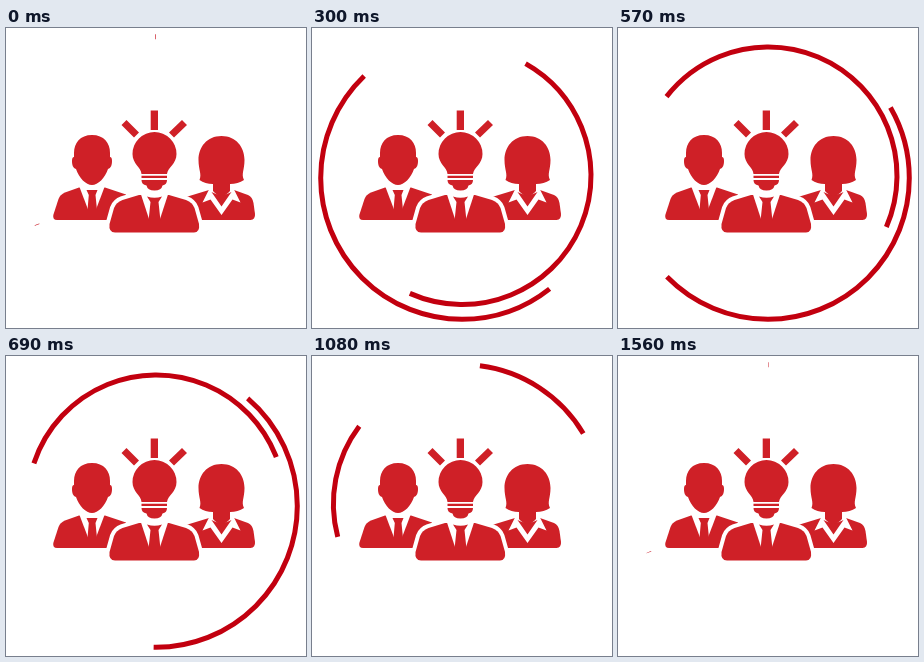
An HTML page without scripts that plays this animation: 300x300 px, repeating every 1.59 s.

```html
<!DOCTYPE html>
<html lang="en">
<head>
<meta charset="utf-8">
<title>Team idea</title>
<style>
  @property --lead { syntax: "<length>"; inherits: false; initial-value: 0px; }
  @property --tail { syntax: "<length>"; inherits: false; initial-value: 0px; }

  html, body { margin: 0; width: 100%; height: 100%; overflow: hidden; background: #fff; }
  svg { display: block; width: 100vw; height: 100vh; }

  .team { fill: #cf2027; }
  .gap { fill: #fff; }
  .front { stroke: #fff; stroke-width: 8; paint-order: stroke; }

  /* One turn is 360 units; both ends of the arc chase each other round. */
  .arc {
    fill: none;
    stroke: #c2000f;
    stroke-width: 5;
    stroke-dasharray: calc(var(--lead) - var(--tail)) 360px;
    stroke-dashoffset: calc(0px - var(--tail));
    animation: lead 1590ms infinite, tail 1590ms cubic-bezier(.3, 0, .53, 1) infinite;
  }
  @keyframes lead {
    0% { --lead: 0px; animation-timing-function: cubic-bezier(.167, .167, 0, 1); }
    90.566%, 100% { --lead: 360px; }
  }
  @keyframes tail {
    from { --tail: 0px; }
    to { --tail: 360px; }
  }
</style>
</head>
<body>
<svg viewBox="0 0 300 300">
  <circle class="arc" r="141.3" pathLength="360" transform="translate(150 150) rotate(-90) scale(1 -1)"/>
  <circle class="arc" r="128.8" pathLength="360" transform="translate(150.2 147.7) rotate(-202.2) scale(1 -1)"/>

  <g class="team">
    <g id="man">
      <path d="M86 107C98 107 104 115 104 125V129Q106 129 106 133C106 137 105 140 102 141C99 150 92 157 86 157S73 150 70 141C67 140 66 137 66 133Q66 129 68 129V125C68 115 74 107 86 107Z"/>
      <path d="M73 159.5L59 164.500Q54 166.500 52.500 171L47.300 187Q46.500 192 51 192H120V166.500L99 159.500Z"/>
      <path class="gap" d="M73.500 159L82 181.500H90L98.500 159Z"/>
      <path d="M80.500 162H91.500L89.500 167L91 182H81.500L82.800 167Z"/>
    </g>

    <g id="woman">
      <path d="M203 162L180 169V192H244.500Q249.500 191.500 249 186L247.500 175Q246.500 169 242 167L228 162Z"/>
      <path class="gap" d="M203 161.500L196.500 174.500L204.500 171.500L215.500 187L226.500 171.500L234.500 174.500L228 161.500Z"/>
      <path d="M205.500 164Q215.500 170 225.500 164L215.500 178.500Z"/>
      <path d="M215.500 108C230 108 238.500 119 238.500 132C238.500 142 235 146 238 152Q232 156 224 156V163Q215.500 173 207 163V156Q199 156 193.500 152C196 146 192.500 142 192.500 132C192.500 119 201 108 215.500 108Z"/>
    </g>

    <g id="leader">
      <path class="front" d="M133 167L116.500 172Q110 174.500 108 180L103.500 196Q102.500 204.500 109 204.500H188Q194 204.500 193 196L188.500 180Q186.500 174.500 180 172L163 167Z"/>
      <path class="gap" d="M134.500 165L143.500 192.500H153.500L162.500 165Z"/>
      <path d="M141 168.500Q148.500 171 156 168.500L152.500 174L154.500 193H142.500L144.500 174Z"/>
      <path d="M148.500 104A22 22 0 0 1 170.500 126C170.500 136 162 139 161 146H135.500C135 139 126.500 136 126.500 126A22 22 0 0 1 148.500 104Z"/>
      <path d="M135.500 147.800H161V150H135.500ZM135.500 152H161Q161 156.500 156.500 157.500Q155.500 162.500 148.500 162.500T140.500 157.500Q135.500 156.500 135.500 152Z"/>
      <path d="M144.700 82.500H152V102H144.700ZM120.500 92L133 104.500L128 109.500L115.500 97ZM176 92L181 97L168 109.500L163 104.500Z"/>
    </g>
  </g>
</svg>
</body>
</html>
```
